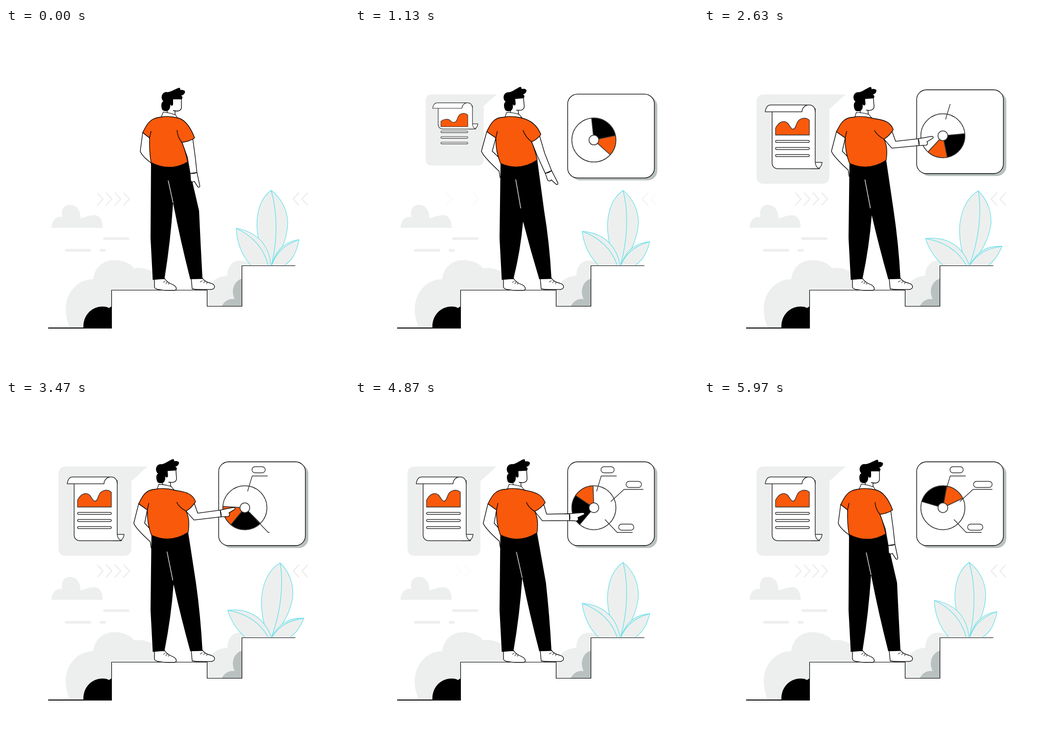
Recreate the animation shown at these times as an HTML page with a canvas. Size 700 by 704 pixels, loop 6010 ms.

```html
<!DOCTYPE html>
<html lang="en">
<head>
<meta charset="utf-8">
<title>Man presenting a chart</title>
<style>
html, body { margin: 0; width: 100%; height: 100%; overflow: hidden; background: #fff; }
canvas { display: block; }
</style>
</head>
<body>
<canvas id="stage" width="700" height="704"></canvas>
<script>
const ctx = document.getElementById('stage').getContext('2d');
const LOOP = 6010, TURN = 2 * Math.PI;
const PALE = '#edefee', GRAY = '#b9c0c0', ORANGE = '#f9590b', CYAN = '#62e0ea', INK = '#000', DARK = '#333';

const rad = d => d * Math.PI / 180;
const clamp = x => Math.max(0, Math.min(1, x));
const ease = (t, a, b) => { const u = clamp((t - a) / (b - a)); return u * u * (3 - 2 * u); };
const mix = (a, b, k) => Array.isArray(a) ? a.map((v, i) => mix(v, b[i], k)) : a + (b - a) * k;
const add = (p, x, y) => [p[0] + x, p[1] + y];
const polar = (p, deg, r) => add(p, r * Math.cos(rad(deg)), r * Math.sin(rad(deg)));

function shape(d, fill, stroke, width = 1.3) {
  const p = new Path2D(d);
  if (fill) { ctx.fillStyle = fill; ctx.fill(p); }
  if (stroke) { ctx.strokeStyle = stroke; ctx.lineWidth = width; ctx.stroke(p); }
}
function box(x, y, w, h, r, fill, stroke, width = 1.4) {
  ctx.beginPath();
  ctx.roundRect(x, y, w, h, r);
  if (fill) { ctx.fillStyle = fill; ctx.fill(); }
  if (stroke) { ctx.strokeStyle = stroke; ctx.lineWidth = width; ctx.stroke(); }
}
function group(draw) { ctx.save(); draw(); ctx.restore(); }
function spin(x, y, deg) { ctx.translate(x, y); ctx.rotate(rad(deg)); ctx.translate(-x, -y); }

function scenery() {
  shape('M93,409 C93,395 102,384 115,387 C112,372 118,362 130,362 C143,362 152,371 152,390 C160,387 170,383 180,383 C192,383 198,395 197,409Z', PALE);
  ctx.lineCap = 'round';
  shape('M201,431H249M123,455H171M194,455H201', null, PALE, 5.5);
  shape('M131,614 C117,585 118,550 142,528 C153,518 166,514 178,514 C181,488 200,475 221,475 C240,475 256,483 261,492 C277,489 290,494 299,499 C306,505 310,520 310,537 L215,537 V614Z', PALE);
  shape('M158,613 C157,587 176,570 197,570 C203,570 207,571 210,573 L215,570 V613Z', INK);
  shape('M410,570 V537 C415,521 430,508 452,507 C451,488 463,476 477,476 C489,476 496,480 499,486 H481 V570Z', PALE);
  shape('M440,570 C446,558 456,553 467,555 C460,543 461,520 481,513 V570Z', GRAY);
  ctx.lineCap = 'butt';
  shape('M86,614H216', null, INK, 2);
  shape('M215.5,614 V536.5 H410.5 V569.5 H481.5 V486.5 H590.5', null, INK, 1.2);
}

// Chevrons fade in and out twice per loop, the outer ones a little later
function chevrons(t) {
  const mark = (x, dir, lag) => group(() => {
    ctx.globalAlpha = clamp(.9 + 1.2 * Math.cos(TURN * (t - lag) / 2950));
    shape(`M${x},337 l${12 * dir},13 l${-12 * dir},13`, null, '#ebeded', 2.4);
  });
  for (let i = 0; i < 4; i++) mark(186 + 18 * i, 1, i % 3 ? 0 : 150);
  for (let i = 0; i < 2; i++) mark(598 + 18 * i, -1, 300 - 150 * i);
}

function plant(t) {
  const sway = (1 - Math.cos(TURN * t / 6000)) / 2;
  const leaf = (x, y, deg, outline, vein) => group(() => {
    spin(x, y, deg * sway);
    shape(outline, PALE, CYAN, 1.2);
    shape(vein, null, CYAN, 1.3);
  });
  group(() => {
    ctx.beginPath();
    ctx.rect(440, 320, 180, 165);
    ctx.clip();
    leaf(540, 484, 7.4, 'M541,332 C519,349 512,376 512,404 C513,437 525,464 537,492 H543 C557,462 574,437 575,398 C574,373 563,349 541,332Z',
      'M541,332 C554,376 555,432 541,490');
    leaf(535, 484, -16.7, 'M470,410 C471,438 480,467 506,492 H541 C540,455 522,419 470,410Z',
      'M470,410 C504,426 528,452 536,490');
    leaf(541, 486, 13.2, 'M598,433 C562,439 549,460 540,492 H556 C583,481 593,461 598,433Z',
      'M598,433 C565,445 549,463 541,490');
  });
}

// Speech bubble grows from its tail while the paper unrolls
function report(t) {
  const scale = ease(t, 500, 1390);
  if (!scale) return;
  const end = mix(170, 288, ease(t, 319, 2026)), top = end - 13;
  const peak = mix(203, 192, ease(t, 900, 1700));
  group(() => {
    ctx.translate(289, 136);
    ctx.scale(scale, scale);
    ctx.translate(-289, -136);
    shape('M123,136 H289 L256,166 V303 Q256,319 240,319 H123 Q107,319 107,303 V152 Q107,136 123,136Z', PALE);
    shape(`M226,${top} H241 C240,${end - 5} 236,${end} 229,${end} H218Z`, '#fff', DARK, 1.5);
    shape(`M139,165 V${top} Q139,${end} 152,${end} H236 Q228,${end - 2} 227,${top} V165Z`, '#fff', DARK, 1.5);
    shape('M125,171.5 C126,164 129,157.5 136,157.5 H214 C222,157 227,163 227,172 H200Z', '#fff');
    shape('M227,172 C227,163 222,157 214,157.5 H136 C129,157.5 126,164 125,171.5 H200 C200,164 206,158 213,157.5', null, DARK, 1.5);
    shape(`M146,219 V205 C153,${peak - 1} 164,${peak - 4} 171,${peak + 3} C176,${peak + 9} 177,207 182,207 C189,206 187,191 196,187 C203,183 211,184 215,189 V219Z`, ORANGE, DARK);
    for (let i = 0; i < 3; i++) box(146, 230 + 14.5 * i, 69, 4.2, 2.1, '#fff', DARK);
  });
}

function callout(t, start, line, length, x, y, w) {
  const drawn = clamp((t - start) / 300), grow = ease(t, start + 300, start + 600);
  if (!drawn) return;
  group(() => {
    ctx.setLineDash([length * drawn, 999]);
    shape(line, null, DARK, 1.4);
  });
  if (grow) box(x + w * (1 - grow) / 2, y, w * grow, 12.5, 6.25, '#fff', DARK);
}

function dashboard(t) {
  const shown = clamp((t - 400) / 400);
  if (!shown) return;
  const [x, y] = [487.5, 220.5], turn = .0604 * t - 164.3;
  const disc = r => box(x - r, y - r, 2 * r, 2 * r, r, '#fff', DARK, 1.5);
  const slice = (from, to, color) => {
    ctx.beginPath();
    ctx.moveTo(x, y);
    ctx.arc(x, y, 45, rad(turn + from), rad(turn + to));
    ctx.closePath();
    ctx.fillStyle = color;
    ctx.fill();
    ctx.stroke();
  };
  group(() => {
    ctx.globalAlpha = shown;
    ctx.translate(0, 40 * (1 - ease(t, 400, 1450)));
    box(440, 131, 177, 172, 20, GRAY);
    box(434, 126.5, 177, 171.5, 20, '#fff', INK, 1.3);
    disc(45);
    slice(0, 84, INK);
    slice(84, 138, ORANGE);
    disc(10);
    callout(t, 2480, 'M493,187 L502.5,155.5 H534', 65, 502, 136.5, 27);
    callout(t, 3300, 'M510,244.5 L535,271 H566.5', 69, 538, 254, 31);
    callout(t, 4350, 'M522,208 L549,183 H588.5', 77, 550, 166.5, 38);
  });
}

// Key moments of the man: time, lean to the left, angle of the pointing forearm
const MOVES = [
  [0, 0, 82], [650, .95, 72], [1130, 1, 67], [1770, .5, -27], [2630, .87, -6],
  [3150, .9, 0], [4270, .37, -36], [5430, .7, 31], [5970, 0, 82]
];
function poseAt(t) {
  const next = Math.max(1, MOVES.findIndex(m => m[0] > t)) ;
  const i = t >= 5970 ? MOVES.length - 1 : next;
  const [a, b] = [MOVES[i - 1], MOVES[i]];
  return mix(a, b, ease(t, a[0], b[0])).slice(1);
}

function head(lean) {
  group(() => {
    ctx.translate(-11 * lean, 0);
    spin(330, 180, -5 * lean);
    shape('M329,166 V184 H345 V166Z', '#fff');
    shape('M329,166 V184 M345,168 V184', null, INK);
    shape('M336,145 H358 V158 C359,167 355,170 349,170 L341,169 L336,160Z', '#fff');
    shape('M358,145 V158 C359,167 355,170 349,170 L341,169', null, INK);
    shape('M318,165 C316,158 317,152 321,150 C315,144 317,132 327,131 C333,132 338,129 344,126 C348,125 350,122 355,122.5 L356,127 C362,126 367,129 365,132 C364,136 360,138 357,138 C361,140 361,144 358,146 H341 V156 C340,161 336,159 335,156 C336,163 333,170 327,170 C322,170 319,169 318,165Z', INK);
    shape('M316,184 L321,172 C330,173 341,176 346,178 L351,185Z', '#fff', INK, 1.1);
  });
}

function trousers(lean, hipL, hipR) {
  const drop = lean ** 3;
  const crotch = [341 + 2 * drop, 358 + 38 * drop], seam = [331 - 3 * lean, 312 - 2 * lean];
  const knee = [394 - 8 * lean, 374], mid = (crotch[1] + 513) / 2;
  shape(`M${hipL} L295,430 L299.5,515.5 L323.5,513 Q${crotch[0] - 5},${mid} ${crotch} Q${crotch[0] + 15},${mid} 376,514 L401,513.5 Q397,440 ${knee} L${hipR} Q335,262 ${hipL}Z`, INK);
  const length = Math.min(1, (369 - seam[1]) / (crotch[1] - seam[1]));
  shape(`M${seam} L${mix(seam, crotch, length)}`, null, '#c9c9c9', 1.6);
}

function pointingArm(angle, raise, tip, inner) {
  const elbow = [378 + 10 * raise, 263 - 26 * raise], shoulder = mix(tip, inner, .5);
  const wrist = polar(elbow, angle, 34 + 17 * clamp(1.8 * raise));
  const upper = Math.atan2(elbow[1] - shoulder[1], elbow[0] - shoulder[0]) * 180 / Math.PI;
  const bend = (upper + angle) / 2 - 90;
  shape(`M${mix(tip, inner, .15)} L${polar(elbow, bend, 8)} L${polar(wrist, angle - 90, 7)} L${polar(wrist, angle + 90, 7)} L${polar(elbow, bend, -8)} L${inner}Z`, '#fff', INK);
  group(() => {
    ctx.translate(...wrist);
    ctx.rotate(rad(angle));
    shape('M0,-7 L13,-8 L28,-9 Q32,-8 30,-5 L17,1 Q20,5 15,8 L0,7 Q2,0 0,-7Z', '#fff', INK);
  });
}

function man(t) {
  const [lean, angle] = poseAt(t);
  const raise = clamp((82 - angle) / 95), back = Math.max(lean, .88 * raise);
  const leftTip = [279 - 10 * back, 214 - 2 * back], leftIn = [293 - 5.5 * back, 225];
  const tip = [385 + 8 * raise - 7 * lean, 225 - 14 * raise - 5 * lean];
  const inner = [359 + 9 * raise, 234 - 7 * raise];
  const seam = [349 + 5 * raise - 7 * lean, 209];
  const side = [366 + 10 * raise, 252 - 7 * raise];
  const hipL = [296 + lean, 275 + 2 * lean], hipR = [371 + lean, 274 - 4 * lean];

  const elbow = [274 - 16 * back, 252], hand = [296 - 2 * back, 276 + 17 * back];
  shape(`M${leftTip} L${elbow} Q${add(elbow, 3, 10)} ${hand} l2,13 l9,2 V276 L${297 - 17 * back},252 L${leftIn}Z`, '#fff', INK);
  shape('M303,514 V530 C304,536 316,536 326,537 H345 C350,534 347,528 340,525 C332,522 327,518 324,513Z', '#fff', INK);
  shape('M378,513 L380,534 C392,536 406,535 420,535 C428,533 427,526 420,523 C410,520 404,518 401,512Z', '#fff', INK);
  shape('M321,521 l4,-3 M326,524 l3,-5 M331,525 l2,-4 M396,520 l5,-3 M403,522 l3,-4 M409,524 l2,-4', null, INK, 1);
  trousers(lean, hipL, hipR);
  pointingArm(angle, raise, tip, inner);
  head(lean);

  const l = 314 - 11 * lean, r = l + 37;
  shape(`M${l},182.5 Q${l + 18},179 ${r},184 C${r + 16},188 ${add(tip, -8, -21)} ${tip} Q${add(mix(tip, inner, .5), 2, 3)} ${inner} L${mix(inner, side, .25)} Q${side} ${hipR} Q${add(mix(hipL, hipR, .5), 1, 21)} ${hipL} Q${add(leftIn, -1, 27)} ${leftIn} L${leftTip} C${add(leftTip, 7, -14)} ${add(leftTip, 13, -29)} ${l},182.5Z`, ORANGE, INK);
  shape(`M${leftIn} l3,-14 M${inner} Q${add(mix(inner, seam, .5), -4, 2)} ${seam}`, null, INK);
}

const began = performance.now();
function frame() {
  const t = (performance.now() - began) % LOOP;
  ctx.fillStyle = '#fff';
  ctx.fillRect(0, 0, 700, 704);
  ctx.lineJoin = 'round';
  scenery();
  chevrons(t);
  plant(t);
  report(t);
  dashboard(t);
  man(t);
  requestAnimationFrame(frame);
}
frame();
</script>
</body>
</html>
```
